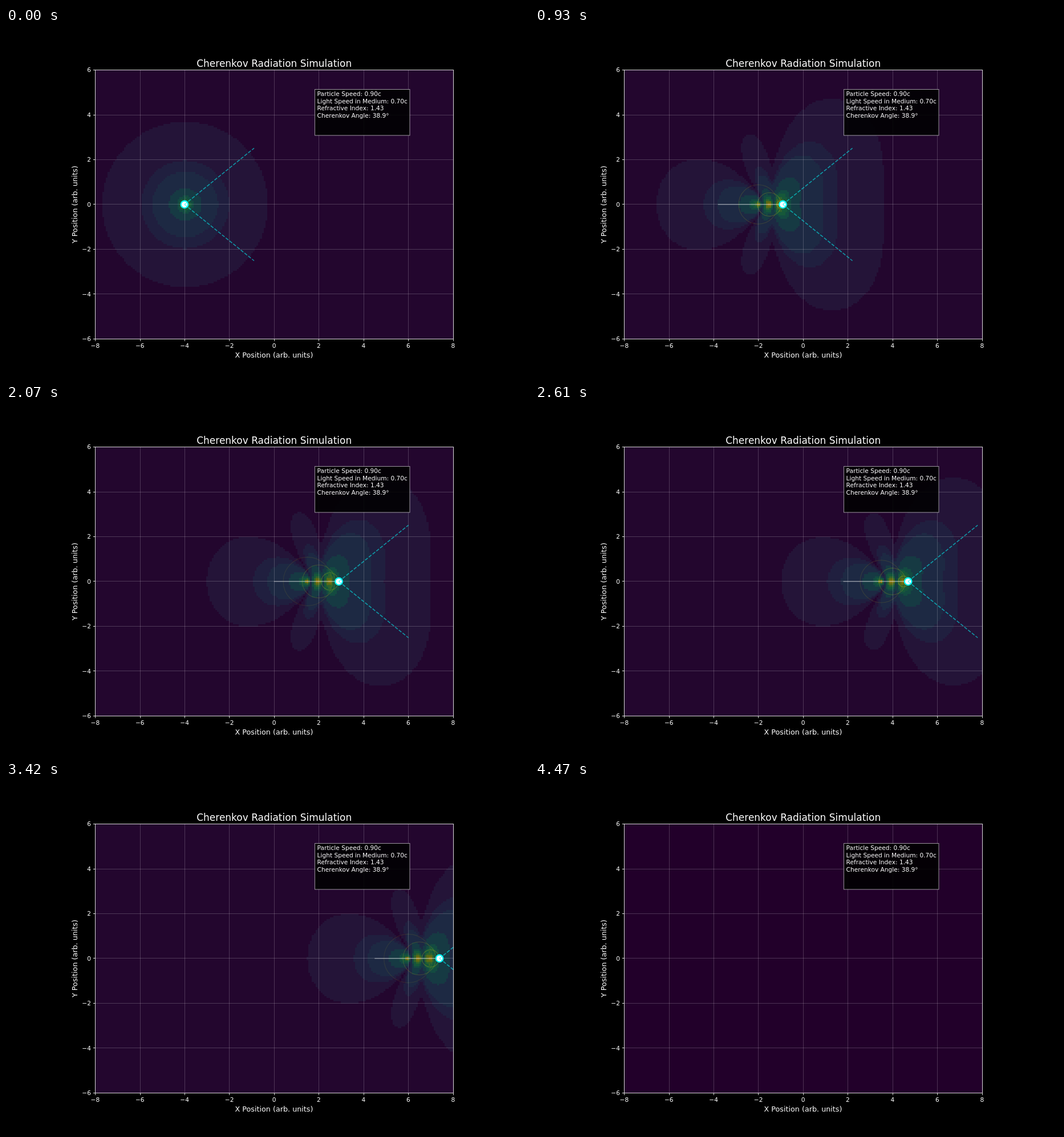
These frames come from a looping animation (917 px wide and 611 px high, 6.15 s). An HTML page with a canvas:

```html
<!DOCTYPE html>
<html lang="en">
<head>
<meta charset="utf-8">
<title>Cherenkov Radiation Simulation</title>
<style>
  html, body { margin: 0; width: 100%; height: 100%; overflow: hidden; background: #000; }
  canvas { display: block; }
</style>
</head>
<body>
<canvas id="stage" width="917" height="611"></canvas>
<script>
const LOOP = 6150, STEP = 30, LAST = 149;
const EMIT_EVERY = 5, EMIT_LIFE = 15, EMIT_END = 120;
const SCALE = 39.219, ORIGIN_X = 469.86, ORIGIN_Y = 308.45;
const COLS = 200, ROWS = 150;
const BOX = { x: 156.5, y: 73.5, w: 628, h: 471 };
const THIN = 0.85;
const WAVE_NUMBER = 2 * Math.PI, LIGHT = 0.7, SPEED = 0.9;
const CONE = Math.acos(LIGHT / SPEED);

// Lower limit of each intensity band and its colour.
const BANDS = [
  [0.9, 125, 110, 15], [0.8, 90, 106, 20], [0.7, 48, 98, 44], [0.6, 22, 88, 58],
  [0.53, 19, 75, 65], [0.39, 22, 58, 67], [0.263, 29, 41, 67], [0.218, 32, 31, 63],
  [0.135, 36, 20, 56], [0.0001, 35, 6, 46], [0, 34, 0, 42]
];

const ctx = document.getElementById("stage").getContext("2d");
const px = x => ORIGIN_X + x * SCALE;
const py = y => ORIGIN_Y - y * SCALE;
const snap = v => Math.round(v) + 0.5;
const particleX = frame => -4 + frame / 10;

const fieldCanvas = document.createElement("canvas");
fieldCanvas.width = COLS;
fieldCanvas.height = ROWS;
const fieldCtx = fieldCanvas.getContext("2d");
const fieldImage = fieldCtx.createImageData(COLS, ROWS);
const amplitude = new Float32Array(COLS * ROWS);
let fieldKey = null;

function emissions(frame) {
  const list = [];
  for (let e = 0; e <= Math.min(frame, EMIT_END); e += EMIT_EVERY) {
    if (frame - e < EMIT_LIFE) list.push(e);
  }
  return list;
}

// Magnitude of the summed, damped spherical waves, scaled to its own peak.
function updateField(sources) {
  const key = sources.join();
  if (key === fieldKey) return;
  fieldKey = key;
  let peak = 0;
  for (let j = 0, i = 0; j < ROWS; j++) {
    const y = 6 - 12 * j / (ROWS - 1);
    for (let c = 0; c < COLS; c++, i++) {
      const x = -8 + 16 * c / (COLS - 1);
      let re = 0, im = 0;
      for (const e of sources) {
        const r = Math.hypot(x - particleX(e), y);
        const phase = WAVE_NUMBER * (r + LIGHT * e / 10);
        const a = Math.exp(-r / 5) / (r + 0.1);
        re += a * Math.cos(phase);
        im += a * Math.sin(phase);
      }
      amplitude[i] = Math.hypot(re, im);
      peak = Math.max(peak, amplitude[i]);
    }
  }
  amplitude.forEach((a, i) => {
    const v = peak ? Math.max(0.001, Math.sqrt(a / peak)) : 0;
    const [, r, g, b] = BANDS.find(band => v >= band[0]);
    fieldImage.data.set([r, g, b, 255], i * 4);
  });
  fieldCtx.putImageData(fieldImage, 0, 0);
}

function line(x1, y1, x2, y2) {
  ctx.beginPath();
  ctx.moveTo(x1, y1);
  ctx.lineTo(x2, y2);
  ctx.stroke();
}

function circle(x, y, r) {
  ctx.beginPath();
  ctx.arc(x, y, r, 0, 2 * Math.PI);
}

function stroke(style, width) {
  ctx.strokeStyle = style;
  ctx.lineWidth = width;
}

// Baselines sit on whole pixels.
function label(text, x, y, size, align = "center") {
  ctx.font = `${size}px "DejaVu Sans", sans-serif`;
  ctx.textAlign = align;
  ctx.fillStyle = "#fff";
  ctx.fillText(text, x, Math.round(y));
}

const tickText = n => String(n).replace("-", "\u2212");

function range(from, to, visit) {
  for (let n = from; n <= to; n += 2) visit(n);
}

function drawGrid() {
  stroke("rgba(255,255,255,0.23)", THIN);
  range(-6, 6, n => line(snap(px(n)), BOX.y, snap(px(n)), BOX.y + BOX.h));
  range(-4, 4, n => line(BOX.x, snap(py(n)), BOX.x + BOX.w, snap(py(n))));
}

function drawAxes() {
  stroke("#fff", THIN);
  ctx.strokeRect(BOX.x, BOX.y, BOX.w, BOX.h);
  const bottom = BOX.y + BOX.h;
  range(-8, 8, n => {
    line(snap(px(n)), bottom, snap(px(n)), bottom + 3.7);
    label(tickText(n), px(n) + 0.2, 560, 10.61);
  });
  range(-6, 6, n => {
    line(BOX.x - 3.7, snap(py(n)), BOX.x, snap(py(n)));
    label(tickText(n), 148.9, py(n) + 4.3, 10.61, "right");
  });
  label("Cherenkov Radiation Simulation", 470.2, 68, 16.98);
  label("X Position (arb. units)", 470, 577, 12.74);
  ctx.save();
  ctx.translate(125, 309);
  ctx.rotate(-Math.PI / 2);
  label("Y Position (arb. units)", 0, 0, 12.74);
  ctx.restore();
}

function drawInfo() {
  ctx.fillStyle = "rgba(0,0,0,0.88)";
  ctx.fillRect(541.5, 107.5, 166.5, 80.5);
  stroke("rgba(255,255,255,0.55)", 1.06);
  ctx.strokeRect(541.5, 107.5, 166.5, 80.5);
  ["Particle Speed: 0.90c", "Light Speed in Medium: 0.70c",
   "Refractive Index: 1.43", "Cherenkov Angle: 38.9\u00b0"]
    .forEach((text, i) => label(text, 545.6, 119.4 + i * 12.45, 10.61, "left"));
}

function drawParticle(frame, sources) {
  const x = particleX(frame), y = 308.9;
  stroke("rgba(255,255,255,0.5)", 1.06);
  line(px(particleX(Math.max(0, frame - 29))), y, px(x), y);

  for (const e of sources) {
    const age = frame - e;
    stroke(`rgba(255,230,0,${0.07 + 0.22 * (1 - age / EMIT_LIFE)})`, 1.06);
    circle(px(particleX(e)), y, 0.07 * (age + 1.5) * SCALE);
    ctx.stroke();
  }

  circle(px(x), y, 6.3);
  ctx.fillStyle = "#fff";
  ctx.fill();
  stroke("#0ff", 2.12);
  ctx.stroke();

  stroke("rgba(0,255,255,0.55)", 1.59);
  ctx.setLineDash([5.9, 2.55]);
  for (const side of [-1, 1]) {
    line(px(x), y, px(x + 4 * Math.cos(CONE)), y + side * 4 * Math.sin(CONE) * SCALE);
  }
  ctx.setLineDash([]);
}

function draw(frame) {
  const sources = emissions(frame);
  updateField(sources);
  ctx.fillStyle = "#000";
  ctx.fillRect(0, 0, 917, 611);
  ctx.save();
  ctx.beginPath();
  ctx.rect(BOX.x, BOX.y, BOX.w, BOX.h);
  ctx.clip();
  ctx.imageSmoothingEnabled = false;
  ctx.drawImage(fieldCanvas, BOX.x, BOX.y, BOX.w, BOX.h);
  drawGrid();
  drawParticle(frame, sources);
  ctx.restore();
  drawAxes();
  drawInfo();
}

let shown = -1;
function tick() {
  const frame = Math.min(LAST, Math.floor(performance.now() % LOOP / STEP));
  if (frame !== shown) draw(shown = frame);
  requestAnimationFrame(tick);
}
tick();
</script>
</body>
</html>
```
